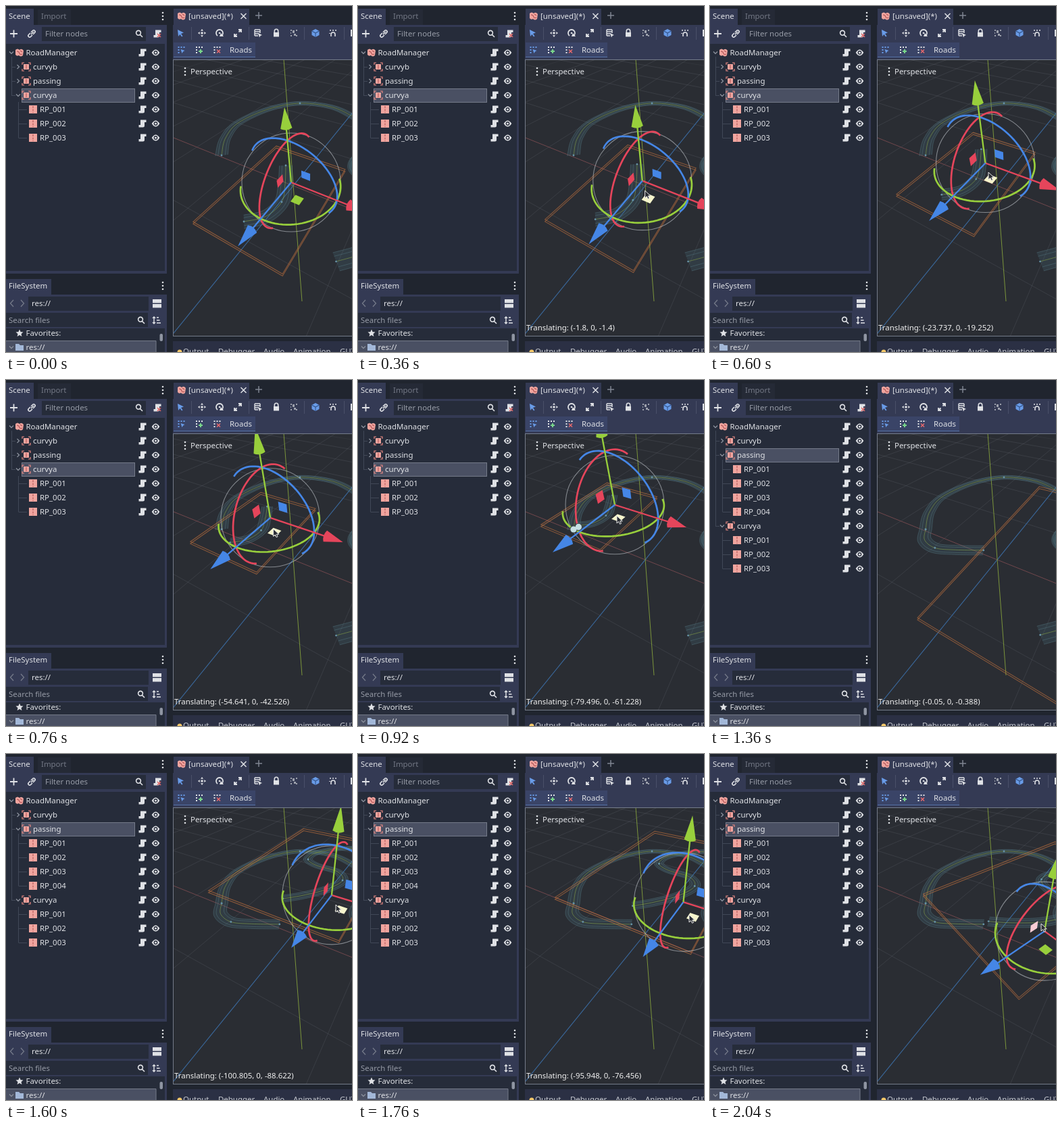
An HTML page with a canvas for the animation above (2.44 s loop, 512x512 px).

```html
<!DOCTYPE html>
<html lang="en">
<head>
<meta charset="utf-8">
<title>Road editor</title>
<style>
html, body { margin: 0; width: 100%; height: 100%; overflow: hidden; background: #20252f; }
canvas { display: block; }
</style>
</head>
<body>
<canvas id="stage" width="512" height="512"></canvas>
<script>
const g = document.getElementById('stage').getContext('2d');
const LOOP = 2440, STEP = 40;
const BASE = '#343a54', PANEL = '#262c3a', DARK = '#20252f', LIGHT = '#e0e2e6', DIM = '#8b909c';
const PINK = '#f0a59f', ACCENT = '#699ce8';
const AXIS = ['#e5455b', '#98cf3c', '#4586e6'], HOT = ['#f8ccd4', '#f6f5cc', '#cfe0fa'];

// ---------- drawing helpers ----------
function rect(x, y, w, h, color) { g.fillStyle = color; g.fillRect(x, y, w, h); }
function trace(pts, closed) {
  g.beginPath();
  pts.forEach(p => g.lineTo(p[0], p[1]));
  if (closed) g.closePath();
}
function line(pts, color, width = 1, closed = false) {
  trace(pts, closed);
  g.strokeStyle = color; g.lineWidth = width; g.stroke();
}
function poly(pts, color) { trace(pts, true); g.fillStyle = color; g.fill(); }
function dot(x, y, r, color) {
  g.beginPath(); g.arc(x, y, r, 0, 7);
  g.fillStyle = color; g.fill();
}
function text(s, x, y, color = LIGHT) {
  g.font = '11.45px "Noto Sans", "Open Sans", sans-serif';
  g.fillStyle = color; g.fillText(s, x, y);
}
function icon(d, x, y, color = LIGHT, width = 0) {
  g.save(); g.translate(x, y);
  const path = new Path2D(d);
  g.fillStyle = g.strokeStyle = color; g.lineWidth = width;
  width ? g.stroke(path) : g.fill(path);
  g.restore();
}
function dots(x, y) { for (const d of [-5, 0, 5]) dot(x, y + d, 1.3, LIGHT); }

// ---------- perspective: ground plane through its vanishing points ----------
const ORIGIN = [425, 266], VX = [-358, -48], VZ = [670, -36], GX = -.00174, GZ = -.00335;
function project([x, z]) {
  const u = GX * x, v = GZ * z, d = 1 + u + v;
  return [0, 1].map(i => (ORIGIN[i] + u * VX[i] + v * VZ[i]) / d);
}
function unproject([x, y]) {
  const a = x - VX[0], b = x - VZ[0], c = ORIGIN[0] - x;
  const d = y - VX[1], e = y - VZ[1], f = ORIGIN[1] - y, k = a * e - b * d;
  return [(c * e - b * f) / k / GX, (a * f - c * d) / k / GZ];
}
const turn = ([x, z], a) => [x * Math.cos(a) - z * Math.sin(a), x * Math.sin(a) + z * Math.cos(a)];

// ---------- road pieces, in ground units ----------
const same = p => p;
const ringRoad = [[319, 221], [325, 195], [345, 172], [390, 152], [435, 144], [480, 149], [512, 163],
  [542, 185], [533, 207], [517, 236], [535, 262]].map(unproject);
const curve = {
  home: [-4, -2.9], box: [-47.7, -41.8, 35.6, 72.5], snap: [-37.8, 11.7], angle: 1.64, snapAt: 1000,
  road: [[352, 319], [385, 311], [408, 290], [413, 264], [414, 236]].map(unproject),
  keys: [[120, 0, 0, 520, 400], [320, 0, 0, 426, 276], [520, -9, -7, 419, 262],
    [600, -23.737, -19.252, 412, 246], [640, -36, -28.5, 405, 235],
    [920, -79.496, -61.228, 383, 201], [1000, -86, -66, 381, 198]]
};
const passing = {
  home: [108, 15], box: [-19.5, -148.7, 142.5, 78.8], snap: [37.6, -24.2], angle: .37, snapAt: 1960,
  road: [[410, 214], [440, 209], [475, 200], [498, 187], [490, 174], [460, 165], [447, 156],
    [457, 147], [485, 141], [515, 139]].map(unproject).map(p => [p[0] + 100.805, p[1] + 88.622]),
  keys: [[1320, 0, 0, 610, 380], [1360, -.05, -.388, 609, 379], [1600, -100.805, -88.622, 488, 223],
    [1760, -95.948, -76.456, 490, 238], [1920, -92, -66, 490, 251]]
};
function sample(keys, t) {
  if (t <= keys[0][0]) return keys[0].slice(1);
  const i = keys.findIndex(k => k[0] > t);
  if (i < 0) return keys[keys.length - 1].slice(1);
  const a = keys[i - 1], b = keys[i], f = (t - a[0]) / (b[0] - a[0]);
  return a.slice(1).map((v, j) => v + (b[j + 1] - v) * f);
}
function pose(part, t) {
  const [dx, dz, mx, my] = sample(part.keys, t), [hx, hz] = part.home;
  const snapped = t >= part.snapAt, angle = snapped ? part.angle : 0;
  const at = snapped ? part.snap : [hx + dx, hz + dz];
  const place = ([x, z]) => {
    const p = turn([x - hx, z - hz], angle);
    return [at[0] + p[0], at[1] + p[1]];
  };
  return { at, angle, place, snapped, shift: [dx, dz], mouse: [mx, my],
    dragging: t > part.keys[0][0] && !snapped && (dx || dz) };
}

// ---------- 3D view ----------
function road(points, place, marks) {
  const pts = points.map(place), n = pts.length, path = [];
  for (let i = 0; i < n - 1; i++) {
    const [a, b, c, d] = [-1, 0, 1, 2].map(k => pts[Math.max(0, Math.min(n - 1, i + k))]);
    for (let s = 0; s < 10 + (i == n - 2); s++) {
      const f = s / 10;
      path.push([0, 1].map(k => b[k] + .5 * f * (c[k] - a[k] +
        f * (2 * a[k] - 5 * b[k] + 4 * c[k] - d[k] + f * (3 * (b[k] - c[k]) + d[k] - a[k])))));
    }
  }
  const rail = w => path.map((p, i) => {
    const a = path[Math.max(0, i - 1)], b = path[Math.min(path.length - 1, i + 1)];
    const x = b[0] - a[0], z = b[1] - a[1], l = Math.hypot(x, z) || 1;
    return project([p[0] - z / l * w, p[1] + x / l * w]);
  });
  poly([...rail(-6.5), ...rail(6.5).reverse()], 'rgba(72,108,120,.24)');
  for (const w of [-6.5, -3.8, 3.8, 6.5]) line(rail(w), 'rgba(92,132,142,.38)');
  line(rail(0), 'rgba(150,180,72,.5)');
  marks.forEach(i => dot(...project(pts[i]), 1.4, '#6793a8'));
}
function floor() {
  const row = (a, b, color, width) => line([project(a), project(b)], color, width);
  for (let i = -14; i <= 5; i++) {
    const k = i * 64, color = `rgba(120,126,134,${i < -5 ? .1 : .2})`;
    if (!i) continue;
    if (i < 4) row([k, -1400], [k, Math.min(210, 250 - k * .5)], color);
    if (i < 3) row([-1400, k], [Math.min(300, 400 - k * 1.9), k], color);
  }
  row([-2000, 0], [400, 0], '#70474c');
  row([0, -900], [0, 220], '#3a689c', 1.1);
  line([[411, 79], [438, 437]], '#84a03d', .9);
}
function boxLines([x0, z0, x1, z1], place) {
  const corners = [[x0, z0], [x1, z0], [x1, z1], [x0, z1]].map(p => project(place(p)));
  for (const d of [0, -3])
    line(corners.map(p => [p[0], p[1] + d]), 'rgba(190,112,62,.64)', 1.1, true);
}
const EYE = [447, 264], FOCAL = 291;
const CAM = [[.884, .342, -.319], [0, -.689, -.724], [-.47, .633, -.614]];
const RING = .25, ARROW = .393, PLANE = .085;
function gizmo(at, angle, hot) {
  const c = project(at), o = [(c[0] - EYE[0]) / FOCAL, (c[1] - EYE[1]) / FOCAL, 1];
  const cs = Math.cos(angle), sn = Math.sin(angle);
  const mix = (a, p, b, q) => a.map((v, i) => v * p + b[i] * q);
  const dirs = [mix(CAM[0], cs, CAM[2], sn), CAM[1], mix(CAM[0], -sn, CAM[2], cs)];
  const show = v => {
    const z = 1 + v[2];
    return [EYE[0] + FOCAL * (o[0] + v[0]) / z, EYE[1] + FOCAL * (o[1] + v[1]) / z];
  };
  g.beginPath(); g.arc(c[0], c[1], 73, 0, 7);
  g.strokeStyle = 'rgba(205,210,216,.55)'; g.lineWidth = 1.1; g.stroke();
  dirs.forEach((dir, i) => {
    const a = dirs[(i + 1) % 3], b = dirs[(i + 2) % 3];
    // only the half of the ring that faces the camera
    const start = Math.atan2(...[b, a].map(v => -(v[0] * o[0] + v[1] * o[1] + v[2])));
    const ring = [];
    for (let k = -24; k <= 24; k++) {
      const q = start + k * Math.PI / 48;
      ring.push(show(mix(a, RING * Math.cos(q), b, RING * Math.sin(q))));
    }
    line(ring, AXIS[i], 2.7);
  });
  dirs.forEach((dir, i) => {
    const a = dirs[(i + 1) % 3], b = dirs[(i + 2) % 3];
    poly([[-1, -1], [1, -1], [1, 1], [-1, 1]].map(([p, q]) =>
      show(mix(a, PLANE + p * .023, b, PLANE + q * .023))), hot == i ? HOT[i] : AXIS[i]);
    const tip = show(dir.map(v => v * ARROW)), base = show(dir.map(v => v * ARROW * .78));
    line([c, base], AXIS[i], 2.3);
    const x = tip[0] - base[0], y = tip[1] - base[1], l = Math.hypot(x, y) || 1, ux = x / l, uy = y / l;
    g.beginPath();
    g.moveTo(...tip);
    g.lineTo(base[0] - uy * 8.7, base[1] + ux * 8.7);
    g.quadraticCurveTo(base[0] - ux * 5, base[1] - uy * 5, base[0] + uy * 8.7, base[1] - ux * 8.7);
    g.fillStyle = AXIS[i]; g.fill();
  });
}
function pointer([x, y]) {
  const d = 'M0 0V11L2.7 8.5L4.5 12.3L6.5 11.3L4.8 7.8H8.3Z';
  icon(d, x, y, '#2a2d33');
  icon(d, x, y, '#e9e9e9', 1);
}
function view(t) {
  g.save();
  g.beginPath(); g.rect(248, 79, 264, 409); g.clip();
  rect(248, 79, 264, 409, '#2a2d33');
  floor();
  const a = pose(curve, t), b = pose(passing, t), second = t >= 1200;
  const part = second ? passing : curve, cur = second ? b : a;
  road(ringRoad, same, [0, 4]);
  road(curve.road, a.place, [0, 2, 4]);
  road(passing.road, b.place, [0, 3, 6]);
  boxLines(part.box, cur.place);
  gizmo(cur.at, cur.angle, cur.snapped ? (second ? 0 : -1) : (second || t >= 280 ? 1 : -1));
  if (t >= 840 && t < 1000) {
    const [x, y] = project(a.place(curve.road[0])), ends = [[x + 2, y + 2], project(ringRoad[0])];
    for (const p of ends) dot(...p, 5.6, '#39474d');
    for (const p of ends) dot(...p, 4.6, '#c4dfe2');
  }
  if (t >= 120) pointer(cur.mouse);
  dots(265, 97);
  text('Perspective', 273, 101);
  if (cur.dragging) {
    const [x, z] = cur.shift.map(n => +n.toFixed(3));
    text(`Translating: (${x}, 0, ${z})`, 249, 480, '#f2f2f2');
  }
  g.restore();
  g.strokeStyle = '#747b89'; g.lineWidth = 1;
  g.strokeRect(247.5, 79.5, 270, 409);
}

// ---------- docks ----------
const SCRIPT = 'M-3-5.5H5.5V-2H3V3Q3 5.5 .5 5.5H-5.5V2H-3Z';
const OPEN = 'M-3-1.5L0 1.5L3-1.5', SHUT = 'M-1.5-3L1.5 0L-1.5 3';
const SEARCH = 'M2.4-1.2A3.4 3.4 0 1 1-4.4-1.2A3.4 3.4 0 1 1 2.4-1.2M1.5 1.5L5 5';
function rowIcons(y) {
  icon(SCRIPT, 202, y);
  icon('M-5.8 0Q0-9 5.8 0Q0 9-5.8 0Z', 221.5, y);
  dot(221.5, y, 2.9, PANEL); dot(221.5, y, 1.6, LIGHT);
}
function container(name, y, open, chosen) {
  if (chosen) {
    rect(23, y - 10, 168, 21, '#4a5063');
    g.strokeStyle = '#747a89'; g.lineWidth = 1; g.strokeRect(23.5, y - 9.5, 167, 20);
  }
  icon(open ? OPEN : SHUT, 18, y, DIM, 1.3);
  rect(26, y - 4, 8, 8, PINK);
  line([[30, y - 3], [30, y + 3]], '#a94f50');
  icon('M-6-3V-6H-3M3-6H6V-3M6 3V6H3M-3 6H-6V3', 30, y, '#e98983', 1.2);
  text(name, 40, y + 4);
  rowIcons(y);
}
function point(i, y) {
  rect(34, y - 6, 12, 12, PINK);
  g.setLineDash([3, 1.5]);
  line([[40, y - 5], [40, y + 5]], '#b85e5d', 1.2);
  g.setLineDash([]);
  line([[18.5, y + .5], [31, y + .5]], '#414857');
  text('RP_00' + i, 50, y + 4);
  rowIcons(y);
}
function roadIcon(x, y) {
  icon('M-6-4Q-3-7 0-4Q3-7 6-3L5 4Q2 7-1 4Q-4 6-6 3Z', x, y, PINK);
  icon('M-4-2Q-1-2 0 1T4 2M1-3L4-1', x, y, '#b25557', 1.1);
}
function sceneDock(t) {
  rect(0, 4, 41, 25, BASE);
  rect(47, 5, 49, 23, '#252a36');
  text('Scene', 4, 19); text('Import', 52, 19, '#737885');
  dots(232, 15);
  rect(0, 28, 238, 368, BASE);
  icon('M-5.5 0H5.5M0-5.5V5.5', 11.5, 41, LIGHT, 1.8);
  icon('M-1 1L3-3M-2-1L-4.5 1.5A2.1 2.1 0 0 0-1.5 4.5L1 2M-1-2L1.5-4.5A2.1 2.1 0 0 1 4.5-1.5L2 1', 38, 41, LIGHT, 1.6);
  rect(53, 31, 154, 21, PANEL);
  text('Filter nodes', 58, 45, '#969ba6');
  icon(SEARCH, 197, 41, LIGHT, 1.6);
  icon(SCRIPT, 224, 41);
  icon('M0 0L5 5M5 0L0 5', 224, 41, '#e06a6a', 1.6);
  rect(0, 56, 235, 336, PANEL);
  const second = t >= 1200;
  line([[8.5, 75], [8.5, second ? 216 : 132]], '#414857');
  for (const y of [90.5, 111.5, second ? 216.5 : 132.5]) line([[8, y], [14, y]], '#414857');
  icon(OPEN, 8, 69, DIM, 1.3);
  roadIcon(20, 69);
  text('RoadManager', 29.5, 73);
  rowIcons(69);
  container('curvyb', 90, false, false);
  container('passing', 111, second, second);
  let y = 132;
  if (second) {
    line([[18.5, 118], [18.5, 195]], '#414857');
    for (let i = 1; i <= 4; i++, y += 21) point(i, y);
  }
  line([[18.5, y + 10], [18.5, y + 63]], '#414857');
  container('curvya', y, true, !second);
  for (let i = 1; i <= 3; i++) point(i, y + i * 21);
}
function fileDock() {
  rect(0, 404, 67, 24, BASE);
  text('FileSystem', 4, 418);
  dots(232, 414);
  rect(0, 427, 238, 85, BASE);
  icon('M2-5L-2.5 0L2 5', 9, 440, '#747a89', 1.3);
  icon('M-2-5L2.5 0L-2 5', 24, 440, '#747a89', 1.3);
  rect(33, 430, 178, 21, PANEL);
  text('res://', 38, 444);
  rect(217, 434, 13, 5.5, LIGHT); rect(217, 441, 13, 5.5, LIGHT);
  rect(0, 454, 210, 21, PANEL);
  text('Search files', 4, 469, '#969ba6');
  icon(SEARCH, 200, 465, LIGHT, 1.6);
  icon('M-4-5V5M-6-3L-4-5L-2-3M-6 3L-4 5L-2 3M0-4H3M0 0H4.5M0 4H6', 223, 465, LIGHT, 1.4);
  rect(0, 477, 235, 35, PANEL);
  icon('M0-5.5L1.6-1.8L5.5-1.5L2.5 1.2L3.4 5L0 3L-3.4 5L-2.5 1.2L-5.5-1.5L-1.6-1.8Z', 20, 484);
  text('Favorites:', 29.5, 488);
  rect(0, 495, 222, 17, '#4a5063');
  line([[0, 495.5], [222, 495.5], [222, 512]], '#747a89');
  icon(OPEN, 8, 505, DIM, 1.3);
  icon('M-6-5H-1L1-3H6V5H-6Z', 20, 505, '#a3b8d8');
  text('res://', 29.5, 509);
  g.beginPath(); g.roundRect(227.5, 485, 4.5, 11, 2);
  g.fillStyle = '#8f95a2'; g.fill();
}
function toolbars() {
  rect(248, 4, 112, 25, BASE);
  roadIcon(260, 15);
  text('[unsaved](*)', 270, 19);
  icon('M-4-4L4 4M4-4L-4 4', 351.5, 15, LIGHT, 1.5);
  icon('M-5 0H5M0-5V5', 374, 14, '#7f8592', 1.5);
  rect(247, 28, 265, 51, BASE);
  icon('M-4-5L5-.5L1 1L3.5 4.5L2 5.5L-.5 2L-3 5Z', 258, 40, ACCENT);
  icon('M0-6L2-3.3H-2ZM0 6L2 3.3H-2ZM-6 0L-3.3-2V2ZM6 0L3.3-2V2ZM-1.6-1.6H1.6V1.6H-1.6Z', 290, 40);
  icon('M-3 4A5 5 0 1 1 3 4', 316, 40, LIGHT, 1.8);
  icon('M0 5H6L2 0Z', 316, 40);
  dot(316, 40, 1.3, LIGHT);
  icon('M1-5H5V-1M-5 1V5H-1M5-5L1.5-1.5M-5 5L-1.5 1.5', 343, 40, LIGHT, 1.8);
  icon('M-5-5H3M-5-2H3M-5 1H1M-5 4H0M-5-5V4M3-5V0', 373, 40, LIGHT, 1.4);
  icon('M0 0L6 3L3.5 4L2 6.5Z', 373, 40);
  icon('M-4-1H4V5.5H-4Z', 400, 40);
  icon('M-2.7-1V-3A2.7 2.7 0 0 1 2.7-3V-1', 400, 40, LIGHT, 1.6);
  icon('M-5-5H-3V-3H-5ZM3-5H5V-3H3ZM-5 3H-3V5H-5ZM3 3H5V5H3ZM-2-4H1V0H-2ZM0 1H3V4H0ZM-5-1H-4V1H-5Z', 426, 40, '#9da1ac');
  icon('M0-6L5.5-3V3L0 6L-5.5 3V-3Z', 458, 40, ACCENT);
  icon('M-5.5-3L0 0L5.5-3M0 0V6', 458, 40, '#34548a', 1.1);
  icon('M-3 5V2A3 3 0 0 1 3 2V5M-5-4H-3M-1-4H1M3-4H5M-5 0V1', 484, 40, LIGHT, 1.6);
  for (const x of [274.5, 359.5, 441.5, 500.5]) line([[x, 31], [x, 50]], '#4a5069');
  rect(510, 35, 2, 10, LIGHT);

  rect(248, 54, 121, 22, '#3a4467');
  line([[248, 75.5], [369, 75.5]], '#5471a8', 1);
  [ACCENT, '#79d88b', '#ec6a6c'].forEach((color, i) => {
    const x = 259.5 + i * 26.5;
    icon('M-5-5H-3V-3H-5ZM-1-5H1V-3H-1ZM3-5H5V-3H3ZM-5-1H-3V1H-5ZM-5 3H-3V5H-5Z', x, 65, i ? LIGHT : ACCENT);
    icon(['M-1-1L5 1L2.5 2.5L1 5Z', 'M1-1H3V1H5V3H3V5H1V3H-1V1H1Z', 'M0-1L2 1L4-1L5 0L3 2L5 4L4 5L2 3L0 5L-1 4L1 2L-1 0Z'][i], x, 65, color);
  });
  text('Roads', 331, 69);
}
function bottomBar() {
  rect(247, 489, 265, 7, DARK);
  rect(247, 496, 265, 16, '#2b3044');
  dot(257, 512, 3.5, '#f5c869');
  [['Output', 262], ['Debugger', 314], ['Audio', 381], ['Animation', 425], ['GUT', 494]]
    .forEach(([s, x]) => text(s, x, 515, '#c6c9d0'));
}

function frame() {
  const t = Math.floor(performance.now() % LOOP / STEP) * STEP;
  rect(0, 0, 512, 512, DARK);
  sceneDock(t);
  fileDock();
  toolbars();
  view(t);
  bottomBar();
  requestAnimationFrame(frame);
}
frame();
</script>
</body>
</html>
```
